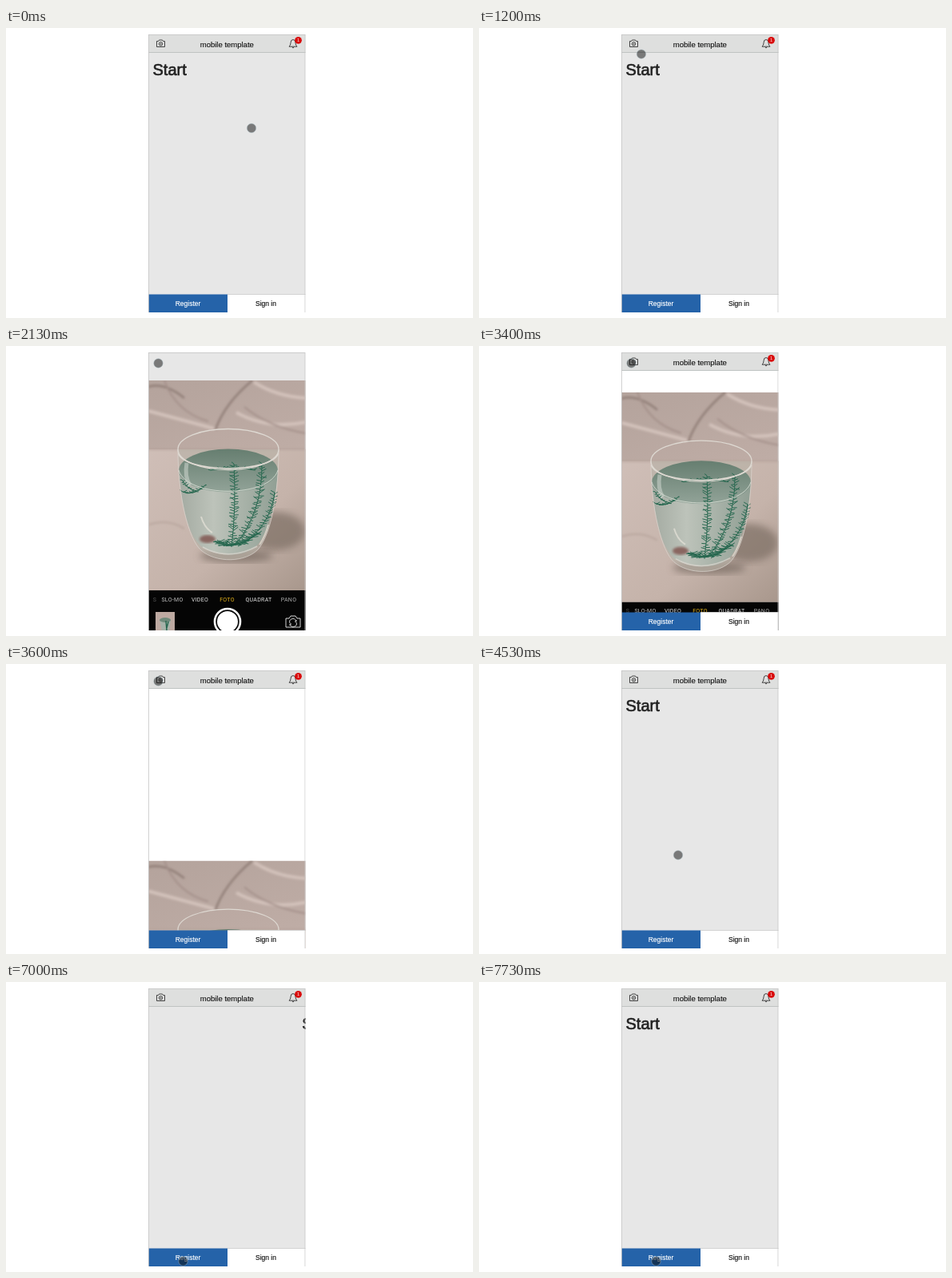
Recreate the animation shown at these times as an HTML page. Size 584x362 px, loop 8000 ms.

```html
<!DOCTYPE html>
<html lang="en">
<head>
<meta charset="utf-8">
<title>Mobile template</title>
<style>
  html, body { margin: 0; width: 100%; height: 100%; overflow: hidden; background: #fff; }
  svg { display: block; width: 584px; height: 362px; }
  text { font-family: "Liberation Sans", Arial, sans-serif; text-anchor: middle; }
  .title { font-size: 9.5px; fill: #111; stroke: #111; stroke-width: .12; }
  .btn { font-size: 8.5px; stroke-width: .15; }
  .head { font-size: 20px; text-anchor: start; fill: #222; stroke: #222; stroke-width: .65; }
  .modes text { font: 7px Roboto, "Open Sans", sans-serif; letter-spacing: .3px; fill: #e4e4e4; }
  .line { fill: none; stroke: #333; stroke-width: .9; }
</style>
</head>
<body>
<svg viewBox="0 0 584 362">
  <defs>
    <clipPath id="screen"><rect x="178" y="8" width="196.5" height="347"/></clipPath>
    <clipPath id="photo"><rect width="197" height="262"/></clipPath>
    <linearGradient id="wall" x1="0" y1="0" x2=".25" y2="1">
      <stop offset="0" stop-color="#b4a39c"/><stop offset="1" stop-color="#c8b5ae"/>
    </linearGradient>
    <linearGradient id="table" x1="0" y1="0" x2="1" y2="1">
      <stop offset="0" stop-color="#cfbeb7"/><stop offset=".6" stop-color="#c5b3aa"/><stop offset="1" stop-color="#a8978c"/>
    </linearGradient>
    <linearGradient id="water" x1="0" y1="0" x2="1" y2="0">
      <stop offset="0" stop-color="#a3aaa1"/><stop offset=".35" stop-color="#bdc3ba"/><stop offset="1" stop-color="#909f94"/>
    </linearGradient>
    <linearGradient id="surface" x1="0" y1="0" x2="0" y2="1">
      <stop offset="0" stop-color="#667e70"/><stop offset="1" stop-color="#92a398"/>
    </linearGradient>
    <filter id="soft"><feGaussianBlur stdDeviation="5"/></filter>
    <filter id="fold"><feGaussianBlur stdDeviation="1.6"/></filter>
  </defs>

  <g clip-path="url(#screen)">
    <rect id="page" x="178" y="8" width="197" height="347"/>
    <text id="start" class="head" x="183.5" y="59">Start</text>

    <g id="camera">
      <g clip-path="url(#photo)">
        <rect width="197" height="262" fill="url(#wall)"/>
        <rect y="86" width="197" height="176" fill="url(#table)"/>
        <g fill="none" filter="url(#fold)">
          <path d="M84 61Q96 28 130 0M0 8Q20 2 45 22" stroke="#8f7d76" stroke-width="2.5"/>
          <path d="M0 38Q45 50 82 60M110 40Q150 62 197 52M132 2Q160 20 197 22" stroke="#d3c2bb" stroke-width="4"/>
          <path d="M120 33Q150 58 197 66M20 0Q35 40 75 51" stroke="#a38f89" stroke-width="2"/>
          <path d="M0 86H197M0 180Q25 172 45 185" stroke="#b3a098" stroke-width="1.5"/>
        </g>
        <ellipse cx="158" cy="188" rx="38" ry="24" fill="#77695f" opacity=".65" filter="url(#soft)"/>
        <ellipse cx="110" cy="219" rx="46" ry="8" fill="#75685f" opacity=".7" filter="url(#soft)"/>
        <path d="M37 86C37 145 50 198 66 212C84 228 122 228 138 210C154 190 163 140 163 86Z" fill="#b9b2a8" opacity=".65"/>
        <path d="M38 112C42 165 52 196 67 208C86 221 120 221 136 206C150 190 160 150 162 112Z" fill="url(#water)"/>
        <ellipse cx="100" cy="112.500" rx="62" ry="27" fill="url(#surface)"/>
        <ellipse cx="74" cy="198" rx="10" ry="5" fill="#896660" filter="url(#fold)"/>
        <path d="M48 103Q45 120 52 131" fill="none" stroke="#d0d8d0" stroke-width="5" opacity=".55"/>
        <path d="M139 205Q146 195 150 180M66 170Q70 184 80 190" fill="none" stroke="#eee9df" stroke-width="2" opacity=".6"/>
        <path id="plant" fill="none" stroke="#286850" stroke-width="1"/>
        <g fill="none" stroke="#ded9d2">
          <ellipse cx="100" cy="86" rx="63" ry="25.500" stroke-width="1.3"/>
          <path d="M37.500 91C46 116 154 116 162.500 91" stroke-width="1.6"/>
          <path d="M38 112C48 147 152 147 162 112" stroke="#d5dcd2" stroke-width=".9"/>
          <path d="M37 86C37 145 50 198 66 212C84 228 122 228 138 210C154 190 163 140 163 86" stroke-width=".9" opacity=".75"/>
          <path d="M68 208Q100 226 136 207" stroke-width="1.5" opacity=".7"/>
        </g>
      </g>
      <rect y="262" width="197" height="70" fill="#050505"/>
      <g id="modes" class="modes"></g>
      <g transform="translate(9 289)">
        <rect width="24" height="24" fill="#bda9a1"/>
        <path d="M5 9H19L17 24H8Z" fill="#a7b2a9"/>
        <ellipse cx="12" cy="10" rx="7" ry="3" fill="#6f8a7b"/>
        <path d="M13 11L14 23M16 12L14 20" stroke="#286850" stroke-width="1.5"/>
      </g>
      <circle cx="99" cy="301" r="16" fill="none" stroke="#fff" stroke-width="2.600"/>
      <circle cx="99" cy="301" r="13" fill="#fff"/>
      <g class="line" style="stroke:#eee">
        <path d="M172 297H176L178 294H184L186 297H190V308H172Z"/>
        <path d="M177 303A4 4 0 0 1 184.500 300M185 302A4 4 0 0 1 177.500 305M183 301H185V299M179 304H177V306"/>
      </g>
    </g>

    <g id="chrome">
      <rect x="178" y="8" width="197" height="22.500" fill="#dedfde"/>
      <path d="M178 30.500H375" stroke="#bfc3c2"/>
      <g id="home">
        <text class="title" x="276.300" y="23.500">mobile template</text>
        <g class="line">
          <path d="M188.500 16.500H190.500L191.500 15H195.500L196.500 16.500H198.500V23.500H188.500Z"/>
          <circle cx="193.500" cy="19.800" r="2.200"/><circle cx="193.500" cy="19.800" r=".5"/>
          <path d="M354 23.200Q356 21.500 356 18.500Q356 14.500 359 14.500Q362 14.500 362 18.500Q362 21.500 364 23.200ZM357.800 24Q359 26 360.200 24"/>
        </g>
        <circle cx="365.500" cy="15.300" r="4.400" fill="#d90b0b"/>
        <text x="365.500" y="17.400" font-size="5.500" fill="#fff">1</text>
        <rect x="178" y="332.500" width="99" height="23" fill="#2563a9"/>
        <rect x="277" y="332.500" width="98" height="23" fill="#fff"/>
        <path d="M277 332.500H375" stroke="#d2d2d2"/>
        <text class="btn" x="227.500" y="347.300" fill="#fff" stroke="#fff">Register</text>
        <text class="btn" x="325" y="347.300" fill="#111" stroke="#111">Sign in</text>
      </g>
      <g id="second">
        <text class="title" x="276.300" y="23.500">Page 2</text>
        <path d="M192.500 15.200L188.500 19.300L192.500 23.400" fill="none" stroke="#222" stroke-width="1.300"/>
        <rect x="178" y="332.500" width="197" height="23" fill="#2563a9"/>
        <text class="btn" x="276.300" y="347.300" fill="#fff" stroke="#fff">Go back</text>
      </g>
    </g>
    <rect x="178.500" y="8.500" width="195.500" height="350" fill="none" stroke="#c6c6c6" stroke-width=".8"/>
    <circle id="dot" r="5.700" fill="#000" fill-opacity=".48" stroke="#a9bcc4" stroke-opacity=".55" stroke-width=".8"/>
  </g>
</svg>

<script>
const LOOP = 8000;
const $ = id => document.getElementById(id);
const show = (id, on) => $(id).setAttribute('visibility', on ? 'inherit' : 'hidden');
const move = (id, x, y) => $(id).setAttribute('transform', `translate(${x.toFixed(2)} ${y.toFixed(2)})`);
const mix = (a, b, p) => a + (b - a) * p;
const part = (t, from, to) => Math.min(1, Math.max(0, (t - from) / (to - from)));
const inOut = p => p < .5 ? 2 * p * p : 1 - 2 * (1 - p) ** 2;

// cubic-bezier(.25, .1, .25, 1)
function ease(x) {
  if (x <= 0 || x >= 1) return x;
  const curve = (a, b, s) => 3 * a * s * (1 - s) ** 2 + 3 * b * s * s * (1 - s) + s ** 3;
  let lo = 0, hi = 1;
  for (let i = 0; i < 20; i++) {
    const mid = (lo + hi) / 2;
    if (curve(.25, .25, mid) < x) lo = mid; else hi = mid;
  }
  return curve(.1, 1, lo);
}

let seed = 7;
const random = () => (seed = seed * 16807 % 2147483647) / 2147483647;

// Each stem is a quadratic curve with short leaves along it: x, y three times, leaf length, leaf count
const stems = [
  [107, 104, 110, 160, 104, 208, 6, 62],
  [142, 104, 143, 165, 108, 206, 6, 66],
  [158, 140, 152, 185, 112, 207, 5, 46],
  [88, 201, 105, 215, 138, 190, 8, 65],
  [43, 139, 56, 145, 72, 130, 4, 22],
  [78, 112, 104, 106, 134, 112, 4, 26],
  [42, 124, 49, 136, 60, 138, 3, 14]
];

function frond([x0, y0, x1, y1, x2, y2, size, count]) {
  let d = `M${x0} ${y0}Q${x1} ${y1} ${x2} ${y2}`;
  const at = (a, b, c, s) => mix(mix(a, b, s), mix(b, c, s), s);
  for (let i = 0; i < count; i++) {
    const s = i / count, side = i % 2 ? 1 : -1, len = size * (.5 + .6 * random());
    const dx = side * len, dy = -len * (random() - .2);
    d += `M${at(x0, x1, x2, s).toFixed(1)} ${at(y0, y1, y2, s).toFixed(1)}l${dx.toFixed(1)} ${dy.toFixed(1)}`;
  }
  return d;
}
$('plant').setAttribute('d', stems.map(frond).join(''));

const modes = [['S', 8], ['SLO-MO', 30], ['VIDEO', 64.5], ['FOTO', 98.5], ['QUADRAT', 138], ['PANO', 175.5]];
$('modes').innerHTML = modes.map(([name, x], i) =>
  `<text x="${x}" y="275.5" style="${i === 3 ? 'fill:#e5b41c' : ''}" opacity="${[.35, .85, 1, 1, 1, .75][i]}">${name}</text>`).join('');

// Pointer moves: start, end, destination
const pointer = [
  [540, 1400, 190.5, 21.5],
  [4020, 4530, 249, 238.5],
  [4670, 5130, 221.5, 348.5]
];

function pointerAt(t) {
  let x = 307, y = 125;
  for (const [from, to, nx, ny] of pointer) {
    const p = inOut(part(t, from, to));
    x = mix(x, nx, p);
    y = mix(y, ny, p);
  }
  return [x, y];
}

function cameraTop(t) {
  if (t >= 3400) return mix(31, 378, ease(part(t, 3336, 4076)));
  return mix(378, 31, ease(part(t, 1565, 2305)));
}

function startOffset(t) {
  if (t < 5600) return 0;
  if (t < 7000) return 197 * ease(part(t, 5495, 6235));
  return 197 * (1 - ease(part(t, 6950, 7700)));
}

function draw(t) {
  const open = t >= 1600 && t < 3400;
  const closing = t >= 3400 && t < 4076;
  const second = t >= 5600 && t < 7000;
  $('page').setAttribute('fill', closing ? '#fff' : '#e7e7e7');
  show('start', !open && !closing);
  show('camera', open || closing);
  show('chrome', !open);
  show('home', !second && !open);
  show('second', second);
  move('start', startOffset(t), 0);
  move('camera', 178, cameraTop(t));
  move('dot', ...pointerAt(t));
}

const origin = performance.now();
function tick() {
  draw((performance.now() - origin) % LOOP);
  requestAnimationFrame(tick);
}
tick();
</script>
</body>
</html>
```
